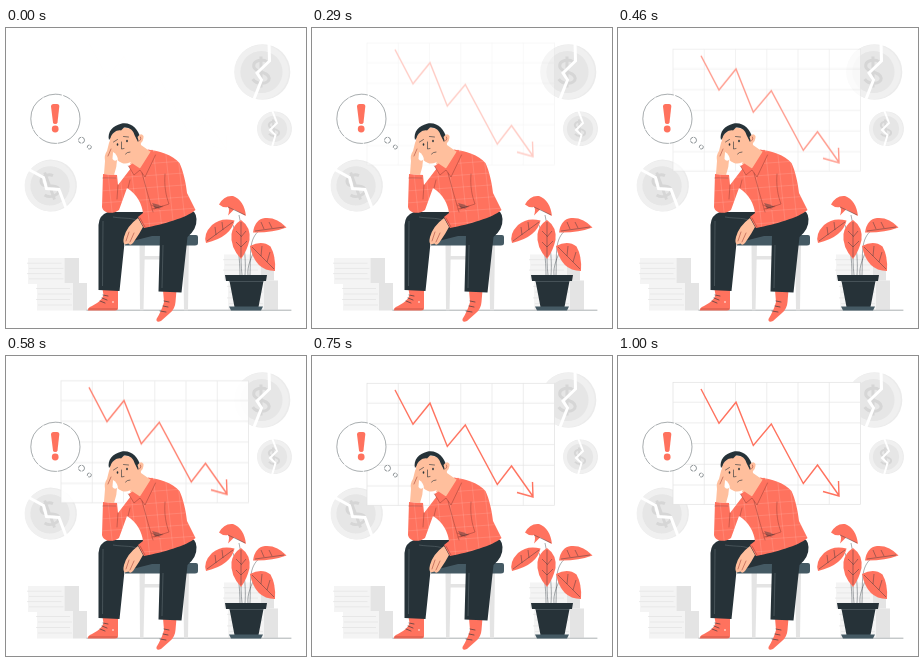
Recreate the animation shown at these times as an HTML page. Size 300x300 px, loop 1.04 s.

```html
<!DOCTYPE html>
<html lang="en">
<head>
<meta charset="utf-8">
<title>Falling chart</title>
<style>
  html, body { margin: 0; width: 100%; height: 100%; overflow: hidden; background: #fff; }
  svg { display: block; width: 100vw; height: 100vh; }
  .red { fill: #ff725e; }
  .dark { fill: #263238; }
  .skin { fill: #ffbf9d; }
  .line { fill: none; stroke: #263238; stroke-width: .6; stroke-linecap: round; stroke-linejoin: round; }
  .fold { fill: none; stroke: #a8483d; stroke-width: .6; stroke-linecap: round; }
  .check { fill: none; stroke: #fff; stroke-opacity: .25; stroke-width: .5; }
  .seam { fill: none; stroke: #77838a; stroke-width: .4; }
  .vein { fill: none; stroke: #263238; stroke-width: .4; }
  .crack { fill: none; stroke: #fff; stroke-width: 3; }
</style>
</head>
<body>
<svg viewBox="0 0 300 300" xmlns="http://www.w3.org/2000/svg">
  <defs>
    <g id="coin">
      <circle r="27" cx=".5" fill="#ebebeb"/>
      <circle r="26.5" cx="-.5" fill="#f0f0f0"/>
      <circle r="20.5" cx="-.5" fill="#e6e6e6"/>
      <path d="M6-9C1-14-9-11-8-5C-7 1 6-1 7 6C7 12-5 13-9 7M-1-15V15" fill="none" stroke="#d6d6d6" stroke-width="3"/>
    </g>
    <path id="shirtShape" d="M142 121.500C153 123 167 127 173.500 135C177 142 180 155 181 165L189.500 182C180 190 158 196 138 200L132 189L137 185C136 176 131 166 121 160L113 182C106 187 97 185 96 179L97 146L111 147L112 157L125 140Z"/>
    <clipPath id="shirt"><use href="#shirtShape"/></clipPath>
  </defs>

  <use href="#coin" transform="translate(256 44) scale(1.03)"/>
  <path class="crack" d="M263 14L263.500 33L251 45L255.500 52L248 71"/>
  <use href="#coin" transform="translate(268.300 100.800) rotate(-5) scale(.64)"/>
  <path class="crack" style="stroke-width:2" d="M266 82L271 95L264 102L269.500 107L266 119"/>
  <use href="#coin" transform="translate(44.500 157.700) rotate(-20) scale(.96)"/>
  <path class="crack" d="M20 140L37.500 149.500L40.500 160.500L53 161.500L60 180"/>

  <g id="board">
    <rect x="55" y="26.3" width="187.5" height="122" fill="#fff" stroke="#e0e0e0" stroke-width=".7"/>
    <path id="grid" fill="none" stroke="#e6e6e6" stroke-width=".7"/>
    <path d="M83 33L101 67.3L118 46.2L135.300 89.5L153.300 68L185.300 127.500L199.500 109L221 139.500M205 135.500L221 140L220.500 125" fill="none" stroke="#ff725e" stroke-width="1.4"/>
  </g>

  <!-- paper stacks -->
  <g id="papers"></g>
  <path class="line" d="M81 282.200H285" stroke-opacity=".65"/>

  <!-- thought bubble -->
  <circle cx="49.400" cy="90.800" r="24.600" fill="#fff" stroke="#263238" stroke-width=".5" stroke-opacity=".8" stroke-dasharray="36 .8 19 1.500 8 .6"/>
  <g class="red">
    <path d="M45 78.500Q45 76 47.500 76H51Q53.500 76 53.300 78.500L51.500 94.500Q51.200 96 49.200 96Q47.300 96 47 94.500Z"/>
    <circle cx="49.200" cy="101" r="3.400"/>
  </g>
  <g fill="#fff" stroke="#263238" stroke-width=".5" stroke-dasharray="4 .8">
    <circle cx="75.500" cy="112.200" r="3"/>
    <circle cx="83.300" cy="119" r="2"/>
  </g>

  <!-- stool -->
  <g fill="#e4e4e4">
    <path d="M133.500 216H139L137.500 282.200H134ZM177 216H183L182 282.200H178Z"/>
    <rect x="137" y="228" width="42" height="3.500"/>
  </g>
  <path d="M119 207H190Q192 207 192 209V215Q192 217.500 189 217.500H119Z" fill="#455a64"/>

  <!-- feet -->
  <path class="red" d="M96.500 261H112L112 280Q112 282.500 109 282.500H82Q81 280 86 278Q96 273 97.500 267Z"/>
  <path class="red" d="M157 262H170.500L169.500 274Q169 281 164 285L155 293Q150 295 150.500 291Q156 282 158 274Z"/>
  <path class="line" d="M94 273L99 275M96 270L101 272M97 267L102 268M154 283L160 284M157 278L162 279M158 273L163 274"/>
  <path class="fold" d="M83 281H111"/>
  <circle cx="107" cy="274" r=".8" fill="#fff"/>

  <!-- trousers -->
  <path class="dark" d="M135 184L181 182Q190 181 190.500 191Q191 201 181.500 209L175.500 264.500L152.500 263.500L154 208H125Z"/>
  <path class="dark" d="M102 184Q93 187 92.500 197L92.500 262L113.500 263L118.500 215L150 207L158 184Z"/>
  <path class="seam" d="M97 193L96.500 258M157 217L156 260M107 189C119 191 127 189 134 194"/>

  <!-- shirt -->
  <use href="#shirtShape" class="red"/>
  <g clip-path="url(#shirt)"><path id="checks" class="check"/></g>
  <path class="skin" d="M132 110L135 117L145 124L139 137L133 141L124 136Z"/>
  <path class="red" d="M146 121.500L149.500 127L139 149L134 142L128 147L122.500 138L126.500 135.500L134 140.500Z"/>
  <path class="fold" d="M149.500 127L139 149L134 142L128 147L122.500 138M136 145L142 167L147 184M159 146C158 158 160 168 163 176L148 181M112 157L111 171M122 160L124 152M97 150H110M134 190L139 199M145 177L154 181M146 181L157 178"/>
  <path class="dark" d="M146 175Q152 176 157 179L149 180.500Z" opacity=".4"/>

  <!-- resting hand -->
  <path class="skin" d="M132 190L137 199L133 206L127 215Q124 218 122.500 215.500L119 216.500Q116.500 215 118 209Q121 198 132 190Z"/>
  <path class="fold" d="M128 205L124 214M123 204L120 213"/>

  <!-- head -->
  <path class="skin" d="M104 108C103 121 108 132 116 135C123 137.500 131 131 134.500 121L135 111L127 101L114 99Z"/>
  <path class="dark" d="M103 112C101 104 107 97.500 115 95.700C125 93.500 132 101 134.500 110L132 114L128.500 107C127.500 102 123 99 118 99.500L115 102.500C111 101.500 106 105 104.500 110Z"/>
  <path class="skin" d="M131.500 109Q135 104 137.500 108Q138 113 133.500 116Z"/>
  <path class="line" d="M107.500 114L111.500 111.500M117.500 108.500L122.500 109M115.500 114L115.500 121L118 120.500M119.500 126Q121 124 124 124"/>
  <ellipse class="dark" cx="111.500" cy="116.500" rx=".8" ry="1.300"/>
  <ellipse class="dark" cx="121" cy="113" rx=".8" ry="1.300"/>
  <path class="fold" d="M134.500 109Q136 111 133.500 113"/>

  <!-- raised hand -->
  <path class="skin" d="M98 146L99 133Q98 127 101 123L103 115Q104 111 106 114L105 121L109 118Q112 119 110 123L111 132Q111 139 108 147Z"/>
  <path d="M107 124Q111 126 112 131.500Q108.500 134 106.500 131Z" fill="#fff"/>
  <path class="fold" d="M105 121L102 128"/>

  <!-- plant -->
  <path class="vein" d="M236 247C235 238 235 230 235 222M239 247C240 235 239 217 233 187M242 247C241 239 245 229 249 222M244 247C245 226 242 211 254 202M234 247C234 233 232 212 227 197"/>
  <g class="red">
    <path d="M213 176.500Q218 167 227 168Q238 172 240 188L228 181.500L222 187.500Q224 181 222 179Q217 180 213 176.500Z"/>
    <path d="M228.500 192.500Q225 209 200 215Q197 206 206 197Q215 189 228.500 192.500Z"/>
    <path d="M235 192Q245 199 243.500 212Q241 223 235 231Q224 219 225.500 206Q227 197 235 192Z"/>
    <path d="M247 204.500Q249 191 259 190Q271 189 280.500 199.500Q266 205 247 204.500Z"/>
    <path d="M244 218Q256 212 264.500 218.500Q270 228 269 243Q249 243 244 218Z"/>
  </g>
  <path class="vein" d="M222 179L239 187M201 213L227 194M235 194V229M249 203L278 199M246 219L268 241M210 207L209 199M217 202L216 194M235 208L230 203M235 209L240 203M235 219L230 214M235 219L241 213M258 201L255 194M266 200L263 194M255 228L256 218M261 234L264 224"/>
  <path class="dark" d="M219 247H261L260 253H257.500L252.500 279H228.500L223.500 253H220Z"/>
  <path d="M223 278.500H257L255 282.500H225Z" fill="#455a64"/>
  <path class="seam" d="M223 253.500H257"/>
</svg>
<script>
  const get = id => document.getElementById(id);
  const range = (n, f) => Array.from({ length: n }, (_, i) => f(i)).join('');

  get('grid').setAttribute('d',
    range(5, i => `M${86.25 + i * 31.25} 26.300v122`) +
    range(5, i => `M55 ${46.2 + i * 20.7}h187.500`));

  get('checks').setAttribute('d',
    range(8, i => `M${99 + i * 12} 118l9 84`) +
    range(7, i => `M94 ${127 + i * 12}l98 -7`));

  // front, shaded side and page edges of one stack
  const stack = (x, y, w, side, h) =>
    `<rect x="${x}" y="${y}" width="${w}" height="${h}" fill="#f4f4f4"/>
     <rect x="${x + w}" y="${y}" width="${side}" height="${h}" fill="#e4e4e4"/>
     <path d="${range(4, i => `M${x - 1 + i % 2 * 2} ${y + h * (i + 1) / 5}h${w - 2}`)}"
       fill="none" stroke="#e2e2e2" stroke-width=".7"/>`;
  get('papers').innerHTML =
    stack(22, 230, 36.5, 14.5, 26) + stack(31, 255, 36, 14, 27.5) +
    stack(218, 226.5, 37, 13, 26) + stack(222, 252.5, 36, 14, 29);

  const LOOP = 1040, DROP = 1000, FPS = 24, STEPS = 25;
  const drop = get('board').animate([
    { opacity: 0, transform: 'translateY(-18px)' },
    { opacity: 1, transform: 'translateY(0)' }
  ], { duration: DROP, fill: 'both', easing: 'cubic-bezier(.36,-.01,.5,1.38)' });
  drop.pause();

  const start = performance.now();
  function draw() {
    const t = (performance.now() - start) % LOOP;
    const step = Math.min(STEPS - 1, Math.floor((t + 5) * FPS / 1000));
    drop.currentTime = (step + 1) * DROP / STEPS;
    requestAnimationFrame(draw);
  }
  draw();
</script>
</body>
</html>
```
